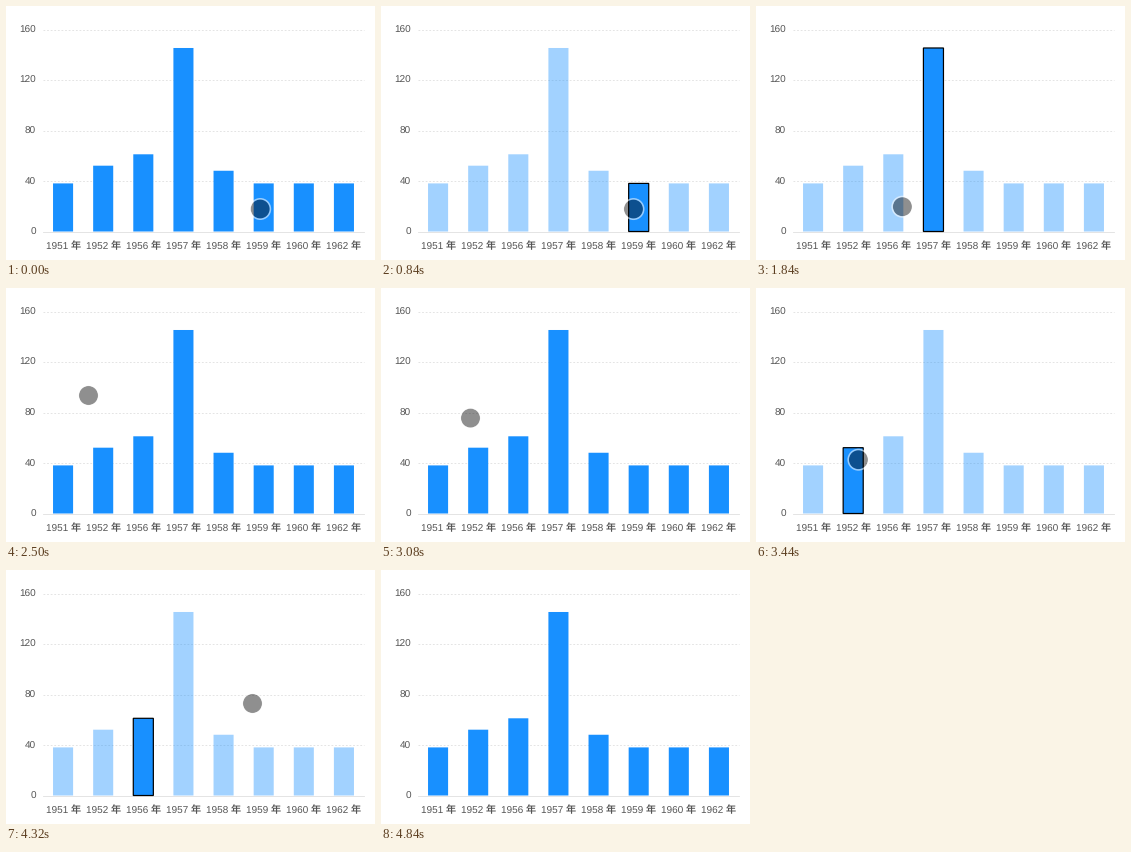
A matplotlib script for the animation above (5.47 s loop, 369 by 254 pixels).

```python
import math

import matplotlib.pyplot as plt
from matplotlib.animation import FuncAnimation
from matplotlib.patches import Circle, Rectangle

WIDTH, HEIGHT, DPI = 369, 254, 64
PX = 72 / DPI  # points per pixel
LOOP, TICK = 5470, 10

YEARS = [1951, 1952, 1956, 1957, 1958, 1959, 1960, 1962]
VALUES = [38, 52, 61, 145, 48, 38, 38, 38]
LEFT, RIGHT, TOP, BOTTOM = 37, 358, 23, 225.5
BAND = (RIGHT - LEFT) / len(YEARS)
BLUE = "#1890ff"
LABEL = "#555555"

# (time, index of the highlighted bar)
SELECTIONS = [(0, None), (480, 5), (1540, 3), (2140, None),
              (3440, 1), (3970, 2), (4560, None)]

# (first step time, last step time, steps, destination, sag of the path)
START = (254.2, 203)
MOVES = [
    (60, 60, 1, (255, 202.2), 0),
    (840, 1310, 9, (181.3, 196.7), 9.7),
    (1720, 1840, 3, (146.4, 200.7), 0),
    (2320, 2500, 4, (82.5, 107.5), 0),
    (2970, 3200, 5, (102.4, 171.7), 0),
    (3680, 3790, 3, (137, 177), 0),
    (4210, 4320, 3, (246.5, 133.5), 0),
    (4730, 4790, 2, (345.5, 234.5), 0),
]
CURSOR_GONE = 4840

plt.rcParams.update({
    "font.family": ["Liberation Sans", "Noto Sans CJK JP"],
    "text.hinting": "none",
})


def y_pos(value):
    return BOTTOM - value / 160 * (BOTTOM - TOP)


def selected_at(t):
    return [bar for start, bar in SELECTIONS if t >= start][-1]


def cursor_at(t):
    x, y = START
    for first, last, steps, (to_x, to_y), sag in MOVES:
        if t < first:
            break
        gap = (last - first) / max(steps - 1, 1)
        done = steps if t >= last else math.floor((t - first) / gap) + 1
        s = done / steps
        ease = s * s * (3 - 2 * s)
        x += (to_x - x) * ease
        y += (to_y - y) * ease + sag * math.sin(math.pi * ease)
        if done < steps:
            break
    return x, y


fig = plt.figure(figsize=(WIDTH / DPI, HEIGHT / DPI), dpi=DPI, facecolor="white")
ax = fig.add_axes([0, 0, 1, 1])
ax.set(xlim=(0, WIDTH), ylim=(HEIGHT, 0))
ax.axis("off")

for value in range(0, 161, 40):
    y = y_pos(value)
    line_y = math.floor(y) + 0.5
    style = "-" if value == 0 else (0, (2, 2))
    ax.plot([LEFT, RIGHT], [line_y, line_y], color="#e2e2e2", lw=0.9 * PX,
            ls=style, dash_capstyle="butt", zorder=1)
    ax.text(30, y + 3.7, str(value), size=10 * PX, color=LABEL,
            ha="right", va="baseline")

bars = []
for i, (year, value) in enumerate(zip(YEARS, VALUES)):
    center = LEFT + BAND * (i + 0.5)
    top = y_pos(value)
    bar = Rectangle((center - BAND / 4, top), BAND / 2, BOTTOM - top,
                    lw=1.2 * PX, joinstyle="miter", snap=False, zorder=2)
    bars.append(ax.add_patch(bar))
    ax.text(center, 243.3, f"{year} 年", size=10 * PX, color=LABEL,
            ha="center", va="baseline")

disc = ax.add_patch(Circle(START, 9.6, fc=(0, 0, 0, 0.44), ec="none", zorder=5))
ring = ax.add_patch(Circle(START, 10.2, fc="none", ec=(1, 1, 1, 0.55),
                           lw=1.6 * PX, zorder=6))


def update(frame):
    t = frame * TICK
    chosen = selected_at(t)
    for i, bar in enumerate(bars):
        faded = chosen is not None and i != chosen
        bar.set_facecolor((BLUE, 0.4 if faded else 1))
        bar.set_edgecolor("black" if i == chosen else "none")
    for part in (disc, ring):
        part.center = cursor_at(t)
        part.set_visible(t < CURSOR_GONE)
    return [*bars, disc, ring]


anim = FuncAnimation(fig, update, frames=LOOP // TICK, interval=TICK,
                     repeat=True, repeat_delay=0)
plt.show()
```
